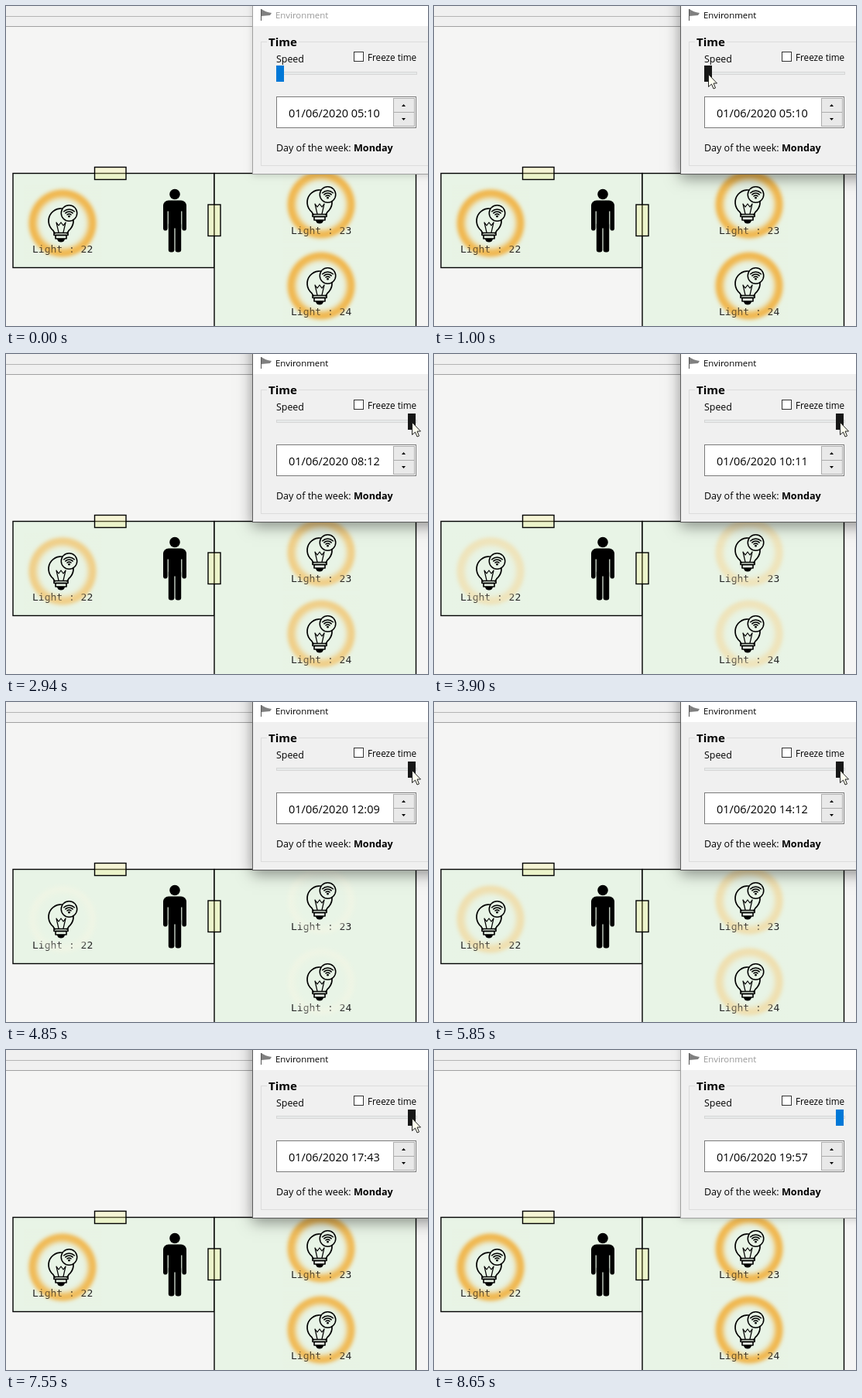
These frames come from a looping animation (545 by 414 pixels, 8710 ms). An HTML page with a canvas:

```html
<!DOCTYPE html>
<html lang="en">
<head>
<meta charset="utf-8">
<title>Environment</title>
<style>
html, body { margin: 0; width: 100%; height: 100%; overflow: hidden; background: #f5f5f4; }
canvas { display: block; }
</style>
</head>
<body>
<canvas id="stage" width="545" height="414"></canvas>
<script>
const c = document.getElementById('stage').getContext('2d');
const LOOP = 8710;
const RATE = 0.12386; // simulated minutes per ms at full speed
const DRAG_START = 1200, DRAG_END = 1610;
const UI = '"Open Sans", "Noto Sans", sans-serif';
const MONO = '"DejaVu Sans Mono", monospace';
const ROOM = '#e8f4e6';

const clamp = v => Math.max(0, Math.min(1, v));
const mix = (a, b, u) => a + (b - a) * u;
const ramp = (t, from, to) => clamp((t - from) / (to - from));
const dragAt = t => ramp(t, DRAG_START, DRAG_END);

// The clock accelerates with the square of the slider value.
function minutesAt(t) {
  const ms = (DRAG_END - DRAG_START) * dragAt(t) ** 3 / 3 + Math.max(0, t - DRAG_END);
  return Math.min(1197, 310.7 + RATE * ms);
}

function pointerAt(t) {
  if (t > 110 && t < 1750) {
    const enter = ramp(t, 110, 630);
    return [517 - 163 * enter + 170 * dragAt(t) + 28 * ramp(t, DRAG_END, 1750), 414 - 326 * enter];
  }
  if (t > 1900 && t < 8560) {
    const leave = ramp(t, 8020, 8560);
    return [552 - 28 * ramp(t, 1900, 2160) - 40 * leave, 88 + 328 * leave];
  }
  return null;
}

function box(x, y, w, h, fill, stroke) {
  if (fill) { c.fillStyle = fill; c.fillRect(x, y, w, h); }
  if (stroke) { c.strokeStyle = stroke; c.lineWidth = 1; c.strokeRect(x + 0.5, y + 0.5, w - 1, h - 1); }
}

function wall(x, y, w, h, fill) {
  c.fillStyle = fill;
  c.fillRect(x, y, w, h);
  c.strokeStyle = '#000';
  c.lineWidth = 1.4;
  c.strokeRect(x, y, w, h);
}

function disc(x, y, r, fill) {
  c.fillStyle = fill;
  c.beginPath();
  c.arc(x, y, r, 0, 2 * Math.PI);
  c.fill();
}

function text(str, x, y, font, color = '#000') {
  c.font = font;
  c.fillStyle = color;
  c.fillText(str, x, y);
}

// Soft ring, strongest at radius 39
function ring(x, y, rgb, alpha) {
  const size = 50;
  const g = c.createRadialGradient(x, y, 0, x, y, size);
  for (let r = 0; r <= size; r += 2) {
    const a = alpha * Math.exp(-(((r - 39) / (r < 39 ? 6.5 : 4.8)) ** 2));
    g.addColorStop(r / size, `rgba(${rgb},${a.toFixed(4)})`);
  }
  c.fillStyle = g;
  c.fillRect(x - size, y - size, 2 * size, 2 * size);
}

function bulb(x, y) {
  c.save();
  c.translate(x - 2, y);
  c.strokeStyle = '#000';
  c.lineWidth = 1.7;
  c.lineCap = c.lineJoin = 'round';

  // glass
  c.beginPath();
  c.moveTo(-8, 13);
  c.arc(0, -3, 16, Math.PI * 0.72, Math.PI * 0.28);
  c.lineTo(8, 13);
  c.stroke();

  // filament
  c.lineWidth = 1.2;
  c.beginPath();
  c.moveTo(-3, 12);
  for (let i = 0; i < 5; i++) c.lineTo(-6 + 3 * i, i % 2 ? 3 : -1);
  c.lineTo(3, 12);
  c.stroke();

  // base
  c.lineWidth = 1.6;
  c.strokeRect(-9, 12.5, 18, 3);
  c.strokeRect(-7, 15.5, 14, 4.5);
  c.fillStyle = '#000';
  c.beginPath();
  c.ellipse(0, 20, 5, 4.5, 0, 0, Math.PI);
  c.fill();

  // wireless badge
  disc(10.5, -13, 11, '#000');
  disc(10.5, -13, 9.5, ROOM);
  for (let r = 3.5; r < 10; r += 3) {
    c.beginPath();
    c.arc(10.5, -8.5, r, -Math.PI * 0.75, -Math.PI * 0.25);
    c.stroke();
  }
  disc(10.5, -8.8, 1.4, '#000');
  c.restore();
}

function light(id, x, y, level) {
  const tint = [mix(246, 241, level), mix(250, 178, level), mix(236, 66, level)].map(Math.round);
  ring(x, y, '241,178,66', 0.8 * level);
  text('Light : ' + id, x - 39, y + 38, '13px ' + MONO, '#222');
  ring(x, y, tint, 0.45);
  bulb(x, y);
}

function person(x, y) {
  const part = (dx, dy, w, h, r) => {
    c.beginPath();
    c.roundRect(x + dx, y + dy, w, h, r);
    c.fill();
  };
  disc(x, y + 7, 6.8, '#000');
  part(-15, 15, 30, 14, [7, 7, 0, 0]);
  part(-8.2, 20, 16.4, 31, 0);
  for (const side of [-1, 1]) {
    part(side * 12.2 - 2.8, 20, 5.6, 34, 2.8);
    part(side * 4.4 - 3.8, 43, 7.6, 39, 3.2);
  }
}

function plan(level) {
  box(0, 0, 545, 414, '#f5f5f4');
  box(0, 0, 545, 26, '#f0f0f0');
  box(0, 13, 545, 1, '#b4b4b4');
  box(0, 26, 545, 1, '#a0a0a0');

  wall(9, 216.5, 260, 122, ROOM);
  wall(269, 216.5, 260.5, 220, ROOM);
  wall(114.5, 208.5, 40.5, 16, 'rgba(243,240,140,.3)');
  wall(261, 257, 16, 40.5, 'rgba(243,240,140,.3)');

  person(218, 236.5);
  light(22, 73, 281, level);
  light(23, 407, 257, level);
  light(24, 407, 362, level);
}

function flag() {
  box(329, 4, 1, 15, '#555');
  c.fillStyle = '#808080';
  c.beginPath();
  c.moveTo(330, 4);
  c.quadraticCurveTo(335, 8, 343, 9);
  c.lineTo(341, 12);
  c.lineTo(330, 13);
  c.fill();
}

function spinButton(y, dir) {
  box(500, y, 28, 19, '#e9e9e9', '#acacac');
  c.fillStyle = '#000';
  c.beginPath();
  c.moveTo(511, y + 9.5 - dir * 1.5);
  c.lineTo(516, y + 9.5 - dir * 1.5);
  c.lineTo(513.5, y + 9.5 + dir * 1.5);
  c.fill();
}

function panel(minutes, slide, hover, active) {
  c.save();
  c.shadowColor = active ? 'rgba(0,0,0,.42)' : 'rgba(0,0,0,.15)';
  c.shadowBlur = active ? 18 : 8;
  c.shadowOffsetY = active ? 5 : 2;
  box(318, -40, 260, 258, '#f0f0f0');
  c.restore();
  box(318, -40, 260, 258, null, active ? '#5c5c5c' : '#a0a0a0');
  box(319, 0, 226, 26, '#fff');
  flag();
  text('Environment', 348, 16, '11.4px ' + UI, active ? '#000' : '#999');

  box(329, 46, 230, 161, null, '#dcdcdc');
  box(337, 44, 41, 5, '#f0f0f0');
  text('Time', 339, 52, 'bold 15px ' + UI);
  text('Speed', 349, 73, '12.4px ' + UI);
  box(449, 59, 13, 13, '#fff', '#333');
  text('Freeze time', 467, 71, '11.7px ' + UI);

  box(349, 85, 182, 4, '#e7eaea', '#d6d6d6');
  box(349 + 170 * slide, 77, 10, 21, hover ? '#171717' : '#0078d7');

  box(349, 117, 181, 41, '#fff', '#7a7a7a');
  spinButton(119, -1);
  spinButton(137, 1);

  const two = n => String(Math.floor(n)).padStart(2, '0');
  text(`01/06/2020 ${two(minutes / 60)}:${two(minutes % 60)}`, 365, 144, '14.5px ' + UI);
  text('Day of the week:', 349, 188, '12.5px ' + UI);
  text('Monday', 449, 188, 'bold 12.6px ' + UI);
}

function pointer([x, y]) {
  c.save();
  c.translate(Math.round(x) + 0.5, Math.round(y) + 0.5);
  const shape = new Path2D('M0 0V16L4 12.5L6.5 18.5L9 17.5L6.5 11.5H11Z');
  c.fillStyle = '#fffff0';
  c.fill(shape);
  c.strokeStyle = '#222';
  c.lineWidth = 1;
  c.stroke(shape);
  c.restore();
}

function draw(t) {
  const minutes = minutesAt(t);
  const slide = dragAt(t);
  const level = clamp(Math.abs(minutes - 720) / 360); // dark at six, bright at noon
  const tip = pointerAt(t);
  const hover = tip && Math.abs(tip[0] - 354 - 170 * slide) <= 5 && Math.abs(tip[1] - 88) <= 10;

  plan(level);
  panel(minutes, slide, hover, t >= 850 && t < 8480);
  if (tip) pointer(tip);
}

const start = performance.now();
function tick(now) {
  draw(Math.max(0, now - start) % LOOP);
  requestAnimationFrame(tick);
}
draw(0);
requestAnimationFrame(tick);
</script>
</body>
</html>
```
